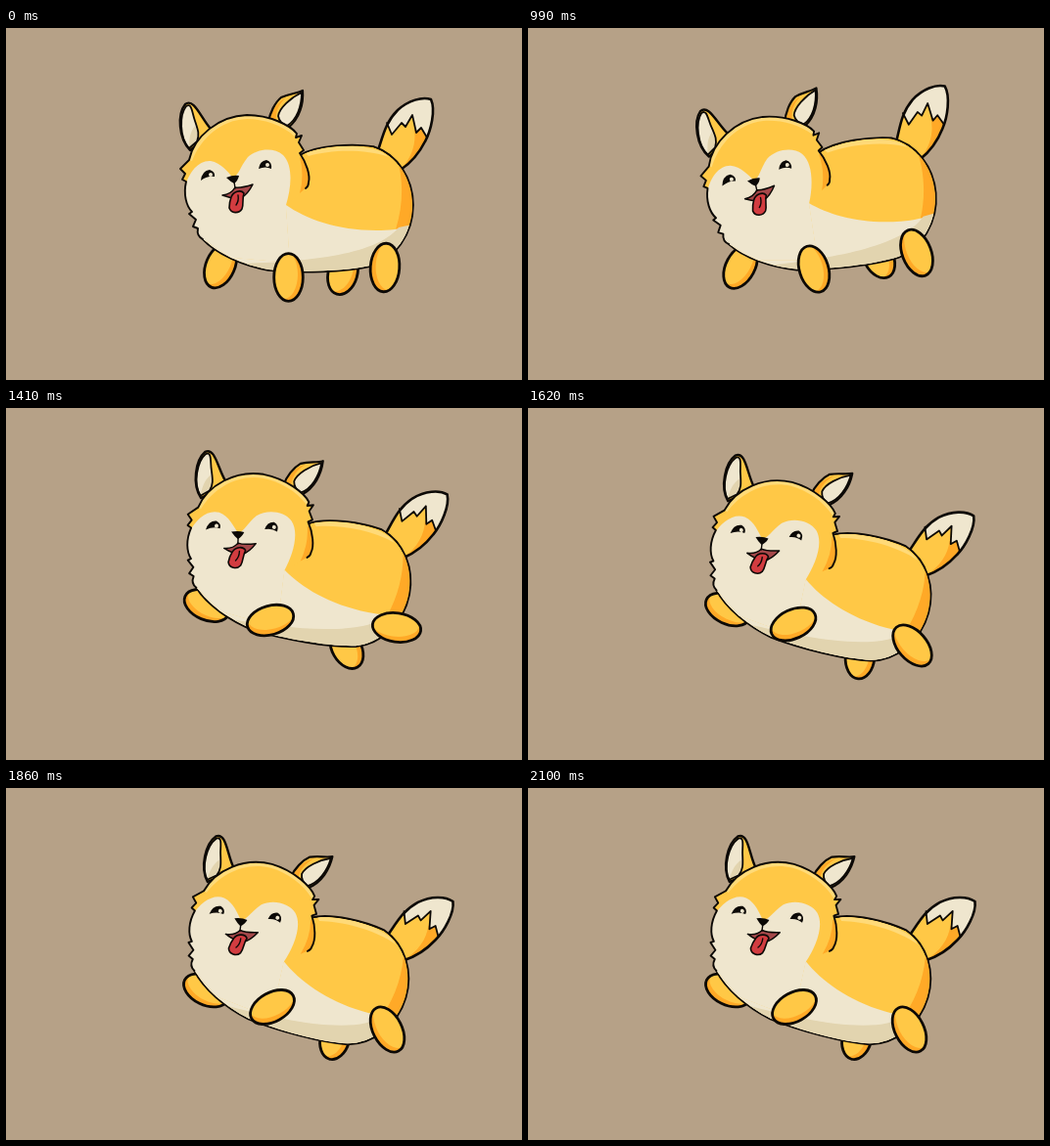
An HTML page with a canvas that plays this animation: 527 px wide and 360 px high, repeating every 2.19 s.

```html
<!DOCTYPE html>
<html lang="en">
<head>
<meta charset="utf-8">
<title>Running pup</title>
<style>
html, body { margin: 0; width: 100%; height: 100%; overflow: hidden; background: #b6a187; }
canvas { display: block; width: 527px; height: 360px; }
</style>
</head>
<body>
<canvas id="stage" width="527" height="360"></canvas>
<script>
const ctx = document.getElementById('stage').getContext('2d');
const LOOP = 2190, START = 780, STEP = 30, LAST = 2100, ANCHOR = 1860;
const BG = '#b6a187', YELLOW = '#ffc846', ORANGE = '#ffa927', LIGHT = '#ffda78';
const CREAM = '#efe6ce', SAND = '#e2d4af', INK = '#0c0906';

// phase, body x, y, tilt, then x, y, angle for far front, near front, near hind, far hind leg
const POSES = [
  [0,    297.6, 180.5, 16.5, 204, 207, 206, 272, 224, 151, 389.5, 247, 63, 336, 256, 105],
  [.028, 297.6, 178,   15.4, 204, 206, 205, 271, 221, 155, 392.5, 243, 49, 339, 255, 95],
  [.178, 298.5, 167.5, 11.1, 205, 202, 203, 270, 217, 164, 399, 224.5, 8,  348, 246, 60],
  [.33,  300.5, 171,   -8,   209, 226, 155, 285, 233, 108, 403, 221, 42,   360, 235, 52],
  [.478, 301,   177.2, -4.7, 217, 244, 118, 292, 246.5, 73, 397, 230, 69,  358, 235, 62],
  [.6275, 300,  180,   0,    219, 243, 113, 288.5, 255, 90, 387, 245, 94,  344, 251, 106],
  [.85,  298.5, 183,   13,   211, 225, 168, 279, 240, 125, 387, 249, 82,   337, 257, 110]
];
const N = POSES.length;

function key(i) {
  const turn = Math.floor(i / N), k = POSES[i - turn * N];
  return [k[0] + turn, k];
}

// periodic cubic through the poses
function poseAt(p) {
  let i = N - 1;
  while (POSES[i][0] > p) i--;
  const [[t0, a], [t1, b], [t2, c], [t3, d]] = [i - 1, i, i + 1, i + 2].map(key);
  const h = t2 - t1, u = (p - t1) / h;
  const slope = (xa, ta, xb, tb, xc, tc) => {
    const l = (xb - xa) / (tb - ta), r = (xc - xb) / (tc - tb);
    return (l * (tc - tb) + r * (tb - ta)) / (tc - ta);
  };
  return b.map((v, j) => {
    if (!j) return p;
    const m1 = slope(a[j], t0, v, t1, c[j], t2) * h;
    const m2 = slope(v, t1, c[j], t2, d[j], t3) * h;
    const e = c[j] - v;
    return v + u * (m1 + u * (3 * e - 2 * m1 - m2 + u * (m1 + m2 - 2 * e)));
  });
}

const P = s => new Path2D(s);
const BODY = P('M300 131C318 120 355 119 375 122C400 130 415 155 415 181C415 211 396 236 372 243C346 249 300 250 268 247C242 242 216 231 201 215L250 150Z');
const HEAD_LINE = 'M201 216C197 214 195 210 196 205L191 203L194 196L187 190L190 188C184 182 181 170 184 157L180 155L183 149L178 144L187 135C192 111 217 90 246 89C270 89 291 100 297 108L296 112L302 110L299 117L304 125L300 128C307 138 311 151 309 158Q309 162 306 164';
const HEAD = P(HEAD_LINE + 'L286 182L290 240L230 235Z');
const HEAD_EDGE = P(HEAD_LINE);
const CHEEK = P('M303 134Q314 150 306 164L300 169Q305 150 300 132Z');
const BROW = P('M187 135C192 111 217 90 246 89C270 89 291 100 297 108L295 111C282 99 263 93 246 93C219 94 199 113 190 136Z');
const MASK = P('M183 162C187 147 197 135 209 136C220 138 226 147 232 153C238 150 239 142 247 132C257 123 274 122 283 130C294 141 291 165 286 181C306 195 338 207 378 207C393 207 404 205 418 202L400 260L190 260L170 190Z');
const BELLY = P('M240 241C300 239 377 234 401 204L420 200L405 260L235 262Z');
const FLANK = P('M399 132C406 154 406 181 398 206L420 204L422 150Z');
const BACK = P('M306 128C330 119 365 118 384 127L391 132C365 123 330 125 309 131Z');

const TAIL = P('M379 128C385 111 387 97 400 84C411 74 425 70 434 73C439 84 434 105 428 116C421 130 412 139 403 145Z');
const TAIL_SHADE = P('M402 146C415 132 419 118 417 104L436 98L430 130Z');
const TIP_CUT = 'M389 97L394 109L404 97L408 101L415 89L419 107L424 102L430 112';
const TAIL_TIP = P(TIP_CUT + 'L445 100L440 65L400 70L384 94Z');
const TAIL_CUT = P(TIP_CUT);

const EAR_L = P('M188 125C176 113 175 88 183 78C192 71 199 92 209 103L198 117Z');
const EAR_L_IN = P('M187 123C177 112 177 89 184 80C190 76 190 87 193 95C196 104 198 109 195 116Z');
const EAR_L_SHADE = P('M187 123C187 112 188 107 193 100L197 111Z');
const EAR_R = P('M268 97C269 87 275 76 281 71C290 67 297 67 303 64C304 77 300 93 288 102Z');
const EAR_R_IN = P('M302 66C291 71 279 82 278 90C279 96 284 99 287 100C297 94 302 80 302 66Z');
const EAR_R_SHADE = P('M270 94C271 84 279 74 286 71C278 79 275 86 276 95Z');

const EYES = P('M199 156Q200 146 208 145Q214 147 213 152Q206 151 199 156ZM258 144Q259 136 266 135Q272 137 271 144Q265 141 258 144Z');
const NOSE = P('M225 153Q232 150 238 151Q237 156 233 159Q229 157 225 153Z');
const MOUTH = P('M221 171Q230 170 234 163Q240 164 252 160Q247 170 240 174Q231 175 221 171Z');
const TONGUE = P('M230 173C232 167 240 165 243 169C241 174 243 180 241 185C238 190 230 190 228 184Q228 178 230 173Z');
const LINES = P('M233 157L234 164M237 171Q238 177 235 181');

function fill(path, color) { ctx.fillStyle = color; ctx.fill(path); }

function line(path, width) {
  ctx.strokeStyle = INK;
  ctx.lineWidth = width;
  ctx.stroke(path);
}

// base shape with coloured areas clipped to it
function shape(path, base, areas) {
  ctx.save();
  ctx.clip(path);
  fill(path, base);
  for (const [area, color] of areas) fill(area, color);
  ctx.restore();
}

function place(pose) {
  ctx.translate(pose[1], pose[2]);
  ctx.rotate(pose[3] * Math.PI / 180);
  ctx.translate(-300, -180);
}

function leg(pose, index, length, side) {
  const [x, y, angle] = pose.slice(4 + index * 3, 7 + index * 3);
  const oval = (dx, dy, a, b) => {
    const o = new Path2D();
    o.ellipse(dx, dy, a, b, 0, 0, 7);
    return o;
  };
  const skin = oval(0, 0, length, 14.8);
  ctx.save();
  ctx.translate(x, y);
  ctx.rotate(angle * Math.PI / 180);
  shape(skin, ORANGE, [[oval(-3, -side * 5, length + 1, 14.5), YELLOW]]);
  line(skin, 2.8);
  ctx.restore();
}

function tail() {
  shape(TAIL, YELLOW, [[TAIL_SHADE, ORANGE], [TAIL_TIP, CREAM]]);
  line(TAIL_CUT, 1.8);
  line(TAIL, 2.6);
}

function ears() {
  shape(EAR_L, YELLOW, [[EAR_L_IN, CREAM], [EAR_L_SHADE, SAND]]);
  line(EAR_L_IN, 1.8);
  line(EAR_L, 2.4);
  shape(EAR_R, YELLOW, [[EAR_R_SHADE, ORANGE], [EAR_R_IN, CREAM]]);
  line(EAR_R_IN, 1.8);
  line(EAR_R, 2.2);
}

function face() {
  fill(EYES, INK);
  ctx.fillStyle = CREAM;
  for (const [x, y] of [[209, 150], [267, 140]]) {
    ctx.beginPath();
    ctx.arc(x, y, 2, 0, 7);
    ctx.fill();
  }
  fill(MOUTH, '#a5484a');
  line(MOUTH, 1.5);
  fill(TONGUE, '#d23c40');
  line(TONGUE, 1.6);
  fill(NOSE, INK);
  line(LINES, 1.4);
}

function dog(pose) {
  ctx.save();
  place(pose);
  tail();
  ctx.restore();

  leg(pose, 0, 24, -1);
  leg(pose, 3, 22, -1);

  ctx.save();
  place(pose);
  ears();
  line(BODY, 3.6);
  shape(BODY, YELLOW, [[BACK, LIGHT], [FLANK, ORANGE], [MASK, CREAM], [BELLY, SAND]]);
  shape(HEAD, YELLOW, [[BROW, LIGHT], [CHEEK, ORANGE], [MASK, CREAM]]);
  line(HEAD_EDGE, 1.9);
  face();
  ctx.restore();

  leg(pose, 1, 24.3, -1);
  leg(pose, 2, 24.8, 1);
}

function phaseAt(time) {
  const t = Math.min(LAST, Math.max(START, Math.floor(time / STEP) * STEP));
  const p = (t - ANCHOR) / (t < ANCHOR ? 247 : 240);
  return p - Math.floor(p);
}

function draw(now) {
  ctx.fillStyle = BG;
  ctx.fillRect(0, 0, 527, 360);
  ctx.lineJoin = ctx.lineCap = 'round';
  dog(poseAt(phaseAt(now % LOOP)));
}

const begin = performance.now();
function tick() {
  draw(performance.now() - begin);
  requestAnimationFrame(tick);
}
tick();
</script>
</body>
</html>
```
